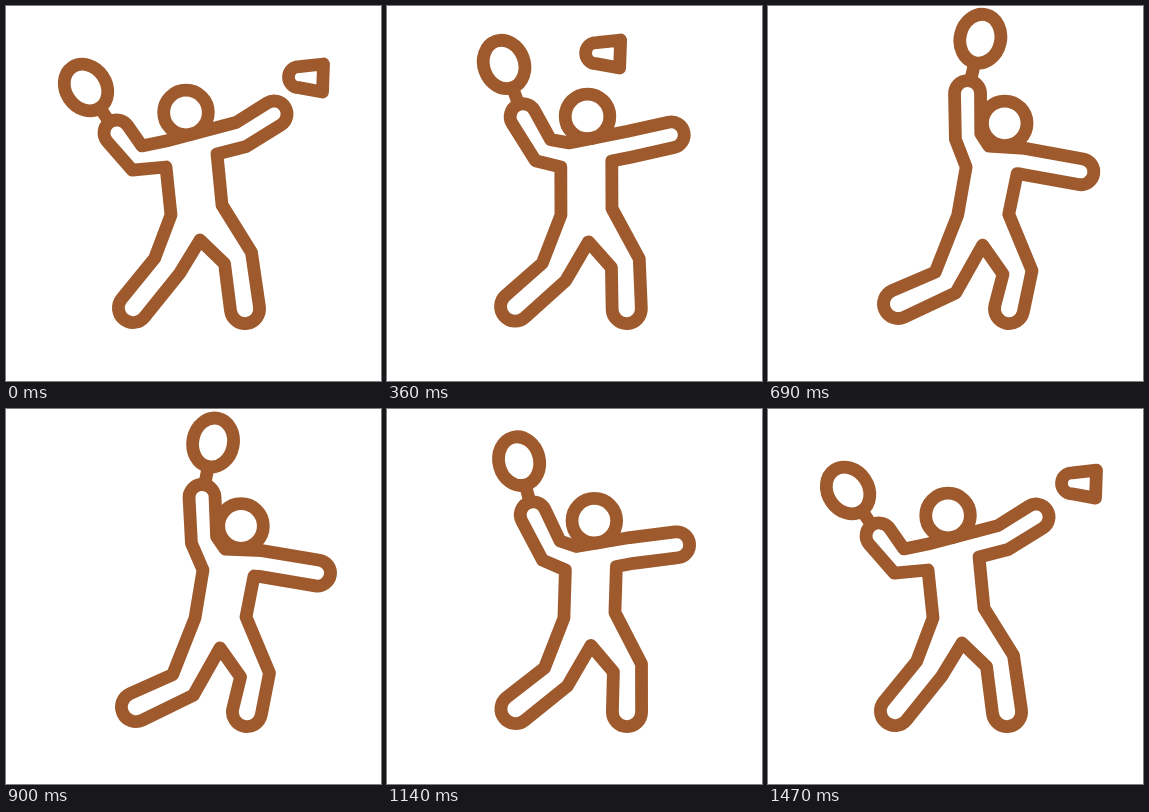
An HTML page that plays this animation: 375x375 px, repeating every 1500 ms.

```html
<!DOCTYPE html>
<html lang="en">
<head>
<meta charset="utf-8">
<title>Badminton smash</title>
<style>
  html, body { margin: 0; width: 100%; height: 100%; overflow: hidden; background: #fff; }
  svg { display: block; width: 100vw; height: 100vh; }
  g { fill: none; stroke: #9e5a2d; stroke-width: 12.8; stroke-linejoin: round; stroke-linecap: round; }
</style>
</head>
<body>
<svg viewBox="0 0 375 375">
  <g>
    <path id="body"/>
    <circle id="head" r="22.3"/>
    <g id="racket">
      <ellipse rx="20.3" ry="24.6"/>
      <path d="M0 26V40"/>
    </g>
    <path id="shuttle" d="M0-14V14L-24 10.5A10.5 10.5 0 0 1-24-10.5Z"/>
    <path id="sparks"/>
  </g>
</svg>
<script>
const LOOP = 1500, STEP = 30;
const SWING = 45, PEAK = 770, REST = 1495, HIT = 450;
const REACH = 1.045; // the swing carries a little past the full pose
const ARM = 13, LEG = 14.6; // half widths of the limbs

// Joints: resting place, place at full stretch, optional bow of the path between.
const joints = {
  racket: [[80, 81.5], [207, 33.5], [-11, -5.5]],
  head: [[180, 106.5], [235, 117]],
  neck: [[160, 135], [219, 140]],
  pitL: [[160, 161], [197, 161]],
  elbowL: [[131, 152], [198, 131]],
  handL: [[111, 127], [196, 88.5], [-7, -2]],
  pitR: [[211, 148], [248, 167]],
  elbowR: [[235, 128.5], [254.5, 154.5]],
  handR: [[268, 108], [311.5, 164]],
  waistL: [[165, 209], [189, 209]],
  waistR: [[216, 199], [240, 208]],
  crotch: [[194, 234], [214, 239]],
  kneeL: [[161, 260], [177, 276]],
  footL: [[127, 302], [130, 298]],
  kneeR: [[232, 252], [249, 266]],
  footR: [[239, 303], [241, 303]]
};

const [body, head, racket, shuttle, sparks] =
  ['body', 'head', 'racket', 'shuttle', 'sparks'].map(id => document.getElementById(id));
const clamp = v => Math.min(1, Math.max(0, v));
const mid = (a, b) => [(a[0] + b[0]) / 2, (a[1] + b[1]) / 2];

function unit(a, b) {
  const x = b[0] - a[0], y = b[1] - a[1], d = Math.hypot(x, y);
  return [x / d, y / d];
}

function ease(u) {
  u = clamp(u);
  return u < 0.5 ? (2 * u) ** 2.4 / 2 : 1 - (2 - 2 * u) ** 2.4 / 2;
}

function swing(t) {
  const p = t < PEAK
    ? ease((t - SWING) / (PEAK - SWING))
    : 1 - ease((t - PEAK) / (REST - PEAK));
  return p * REACH;
}

function pose(k) {
  const place = ([from, to, bow = [0, 0]]) =>
    from.map((v, i) => v + (to[i] - v) * k + bow[i] * 4 * k * (1 - k));
  return Object.fromEntries(Object.entries(joints).map(([name, j]) => [name, place(j)]));
}

// Outline of a bent limb: out along one side, round the tip and back.
function limb(root, bend, tip, half) {
  const a = unit(root, bend), b = unit(bend, tip);
  const c = unit([0, 0], [a[0] + b[0], a[1] + b[1]]);
  const side = (p, d, s) => [p[0] + d[1] * s, p[1] - d[0] * s];
  return `${side(bend, c, half)}L${side(tip, b, half)}` +
    `A${half} ${half} 0 0 1 ${side(tip, b, -half)}L${side(bend, c, -half)}`;
}

function drawPlayer(k) {
  const j = pose(k);
  body.setAttribute('d', 'M' + [
    j.pitL,
    limb(mid(j.neck, j.pitL), j.elbowL, j.handL, ARM),
    j.neck,
    limb(mid(j.neck, j.pitR), j.elbowR, j.handR, ARM),
    j.pitR,
    j.waistR,
    limb(mid(j.waistR, j.crotch), j.kneeR, j.footR, LEG),
    j.crotch,
    limb(mid(j.waistL, j.crotch), j.kneeL, j.footL, LEG),
    j.waistL
  ].join('L') + 'Z');

  head.setAttribute('transform', `translate(${j.head})`);
  const [x, y] = unit(j.racket, j.handL);
  const tilt = -Math.atan2(x, y) * 180 / Math.PI;
  racket.setAttribute('transform', `translate(${j.racket}) rotate(${tilt})`);
}

function drawShuttle(t) {
  let x, y, turn = 2;
  if (t >= HIT && t < 1000) {
    x = 178 + 0.86 * (t - HIT);
    y = 42 - 0.011 * (t - HIT);
    turn = 176;
  } else {
    // Flies in fast, then slows.
    const d = t < HIT ? t * 0.233 : (t - LOOP) * 0.367;
    x = 317 - d;
    y = 72 - 0.286 * d;
  }
  shuttle.setAttribute('transform', `translate(${x} ${y}) rotate(${turn})`);
}

function drawSparks(t) {
  const far = 10 + 34 * clamp((t - 465) / 95);
  const near = 10 + 34 * clamp((t - 500) / 105);
  const ray = deg => {
    const c = Math.cos(deg * Math.PI / 180), s = Math.sin(deg * Math.PI / 180);
    return `M${145 + c * near} ${48 + s * near}L${145 + c * far} ${48 + s * far}`;
  };
  sparks.setAttribute('d', far - near > 0.5 ? ray(205) + ray(115) : '');
}

const start = performance.now();
function frame() {
  const t = Math.floor((performance.now() - start) % LOOP / STEP) * STEP;
  drawPlayer(swing(t));
  drawShuttle(t);
  drawSparks(t);
  requestAnimationFrame(frame);
}
frame();
</script>
</body>
</html>
```
